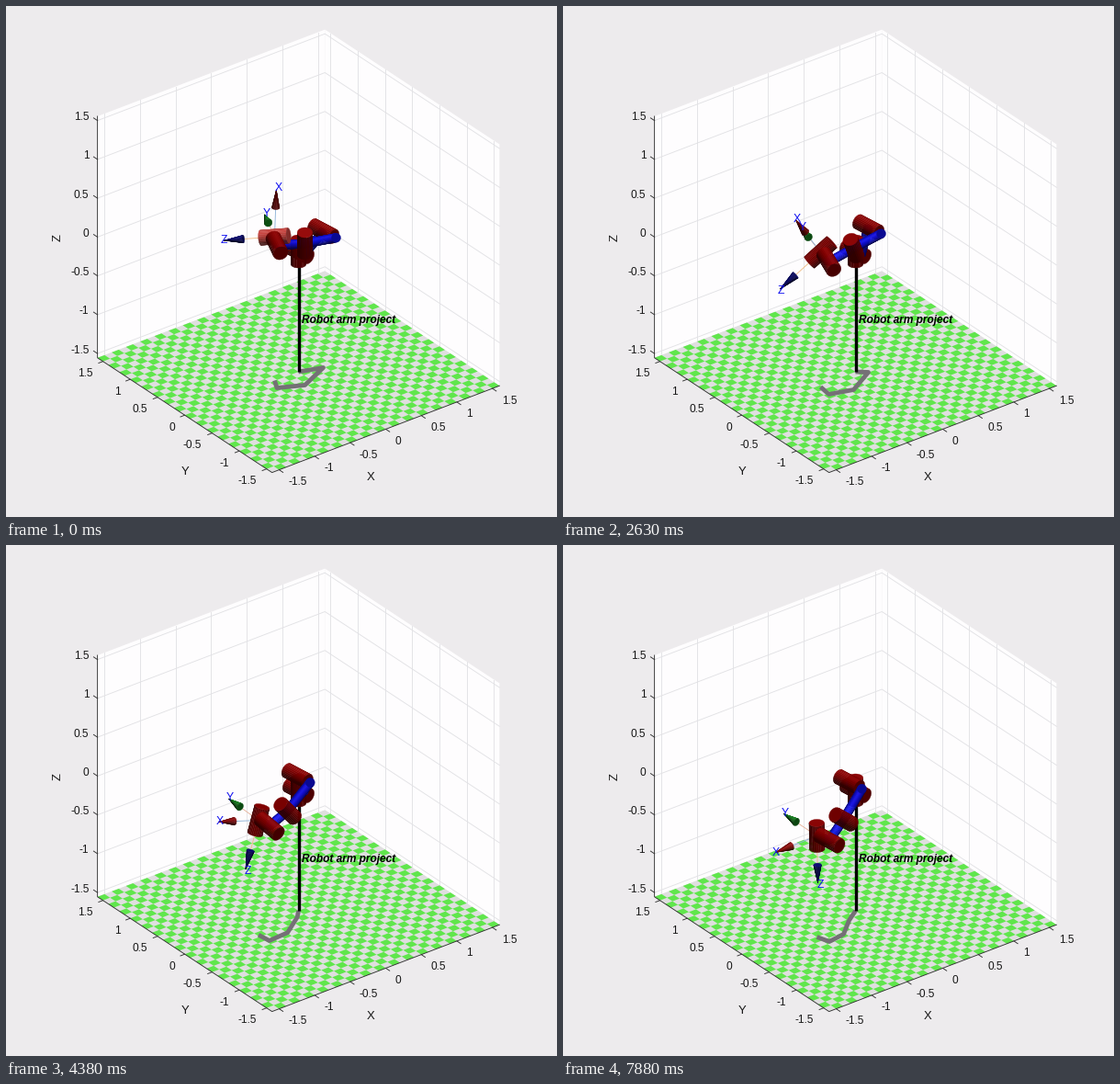
A matplotlib script for the animation above (8000 ms loop, 600 by 556 pixels).

```python
import numpy as np
import matplotlib
import matplotlib.pyplot as plt
from matplotlib.animation import FuncAnimation
from matplotlib.collections import PolyCollection

W, H, DPI = 600, 556, 64
FRAMES, STEP = 64, 125
PT = 72 / DPI
LIM, ZLIM = 1.6, 1.555
TICKS = np.arange(-1.5, 1.6, 0.5)
matplotlib.rcParams["font.family"] = "Liberation Sans"

RED = np.array([0.58, 0.0, 0.0])
PINK = np.array([0.88, 0.3, 0.28])
BLUE = np.array([0.06, 0.06, 0.95])
LIGHT = np.array([0.15, -0.65, 0.75])
JOINT_R, LINK_R, CONE_R, HALF = 8.3, 4.8, 4.3, 16
AXIS_LEN = 58

# Poses along the move: joints hold x, y and the y of their shadow.
NODES = np.array([0, 0.36, 0.66, 1])
JOINTS = {
    "elbow": [(345, 244.5, 393), (332, 240, 398), (321.5, 246, 402), (311, 257.5, 408)],
    "fore": [(325, 258, 412), (316, 263, 417), (308.5, 280, 420), (305, 298, 423)],
    "wrist": [(294.5, 260, 415), (289, 278, 422), (286, 295.5, 428), (289.5, 321, 431)],
    "tool": [(292, 250.5, 407), (280, 267.5, 414), (275, 287.5, 421), (276, 316, 426)],
}
SPINS = {
    "fore": [(0, -12), (-3.5, -9.5), (-6.5, -8.5), (-9, -5)],
    "wrist": [(4, 8.5), (5.5, 9), (8.5, 9), (11, 6)],
}
TRIAD = {
    "Z": [(-55, 4), (-44, 40), (-25, 52), (1, 51)],
    "Y": [(-11, -24), (-21, -26), (-29, -24), (-36, -24)],
    "X": [(2, -51), (-27, -35), (-40, -11), (-45, 18)],
}
CONE = {"X": (0.58, 0.04, 0.04), "Y": (0.08, 0.52, 0.12), "Z": (0.04, 0.04, 0.48)}
STEM = {"X": "#8fb4d8", "Y": "#e6b49c", "Z": "#f0bd86"}
BASE = np.array([318, 266.5])
SIDE = np.array([11.2, 5.9])


def project(x, y, z):
    return (318 + 77.4 * x - 59.4 * y,
            397.5 - 29.5 * x - 39 * y - 84.5 * (z + ZLIM))


def blend(keys, s):
    """Smooth curve through the key poses at progress s."""
    total = 0
    for i, node in enumerate(NODES):
        rest = np.delete(NODES, i)
        total = total + np.prod((s - rest) / (node - rest)) * np.array(keys[i], float)
    return total


def progress(ms):
    t = np.clip((ms + 300) / 6900, 0, 1)
    return t ** 3 * (10 - 15 * t + 6 * t * t)


class Mesh:
    """Shaded polygons, painted in the order they are added."""

    def __init__(self):
        self.verts, self.colors = [], []

    def add(self, poly, normal, rgb):
        lit = max(0, float(np.dot(normal, LIGHT)))
        color = np.array(rgb) * (0.32 + 0.62 * lit) + 0.06 * lit ** 14
        self.verts.append(poly)
        self.colors.append(np.clip(color, 0, 1))

    def tube(self, far, near, r_far, r_near, k, rgb):
        """Cylinder or cone; k is the flatness of its end caps."""
        far, near = np.array(far, float), np.array(near, float)
        u = (near - far) / max(np.hypot(*(near - far)), 1e-6)
        n = np.array([-u[1], u[0]])
        slope = np.sqrt(1 - k * k)

        def ring(a):
            a = np.atleast_1d(a)[:, None]
            return np.cos(a) * n + np.sin(a) * k * u

        angles = np.linspace(np.pi, 2 * np.pi, 15)
        rim = ring(angles)
        mids = (angles[1:] + angles[:-1]) / 2
        for i, mid in enumerate(mids):
            normal = np.append(ring(mid)[0], -np.sin(mid) * slope)
            quad = np.array([far + r_far * rim[i], far + r_far * rim[i + 1],
                             near + r_near * rim[i + 1], near + r_near * rim[i]])
            self.add(quad, normal, rgb)
        if r_near:
            cap = near + r_near * ring(np.linspace(0, 2 * np.pi, 30))
            self.add(cap, np.append(u * slope, k), rgb)

    def joint(self, center, half, rgb=RED):
        k = np.sqrt(max(0.02, 1 - (np.hypot(*half) / HALF) ** 2))
        self.tube(center - half, center + half, JOINT_R, JOINT_R, k, rgb)

    def link(self, a, b):
        self.tube(a, b, LINK_R, LINK_R, 0.5, BLUE)

    def ball(self, center):
        a = np.linspace(0, 2 * np.pi, 24)
        disc = center + 5 * np.column_stack([np.cos(a), np.sin(a)])
        self.add(disc, (0, 0, 0.6), BLUE)

    def cone(self, origin, vec, rgb, toward):
        k = np.sqrt(max(0.03, 1 - min(1, np.hypot(*vec) / AXIS_LEN) ** 2))
        root, tip = origin + 0.62 * vec, origin + vec
        if toward:
            self.tube(root, tip, CONE_R, 0, k, rgb)
        else:
            self.tube(tip, root, 0, CONE_R, k, rgb)


fig = plt.figure(figsize=(W / DPI, H / DPI), dpi=DPI, facecolor="#edebed")
ax = fig.add_axes([0, 0, 1, 1])
# Whole coordinates fall on pixel centres.
ax.set_xlim(-0.5, W - 0.5)
ax.set_ylim(H - 0.5, -0.5)
ax.axis("off")


def stroke(points, color, px, z=1, **kw):
    xs, ys = zip(*points)
    return ax.plot(xs, ys, color=color, lw=px * PT, zorder=z, **kw)[0]


def label(x, y, text, px=11.9, **kw):
    style = dict(ha="center", va="center", color="#161616", zorder=9)
    style.update(kw)
    return ax.text(x, y, text, fontsize=px * PT, **style)


def draw_room():
    b, t, m = -ZLIM, ZLIM, LIM
    left = [(-m, m, b), (m, m, b), (m, m, t), (-m, m, t)]
    right = [(m, m, b), (m, -m, b), (m, -m, t), (m, m, t)]
    for wall in (left, right):
        ax.fill(*zip(*[project(*p) for p in wall]), color="#fefdfe", lw=0, zorder=0)
    grid = "#e2e2e5"
    for v in TICKS:
        stroke([project(v, m, b), project(v, m, t)], grid, 0.9)
        stroke([project(m, v, b), project(m, v, t)], grid, 0.9)
        stroke([project(-m, m, v), project(m, m, v), project(m, -m, v)], grid, 0.9)

    floor = [(-m, -m), (m, -m), (m, m), (-m, m)]
    ax.fill(*zip(*[project(x, y, b) for x, y in floor]), color="#dfdfdf", lw=0, zorder=2)
    tile = 0.1
    tiles = []
    for i in range(32):
        for j in range((i + 1) % 2, 32, 2):
            x, y = -m + i * tile, -m + j * tile
            tiles.append([project(x + dx, y + dy, b)
                          for dx, dy in ((0, 0), (tile, 0), (tile, tile), (0, tile))])
    ax.add_collection(PolyCollection(tiles, facecolors="#60e64c", linewidths=0, zorder=2))


def draw_rulers():
    b, t, m = -ZLIM, ZLIM, LIM
    ink = "#303030"
    stroke([project(-m, m, t), project(-m, m, b), project(-m, -m, b), project(m, -m, b)],
           ink, 0.9, 3)
    for v in TICKS:
        text = f"{v:g}"
        x, y = project(v, -m, b)
        stroke([(x, y), (x + 4.2, y + 2.8)], ink, 0.9, 3)
        label(x + 10, y + 13.5, text, ha="left")
        x, y = project(-m, v, b)
        stroke([(x, y), (x - 4.7, y + 1.8)], ink, 0.9, 3)
        label(x - 11, y + 13.5, text, ha="right")
        x, y = project(-m, m, v)
        stroke([(x, y), (x - 4.2, y - 2.8)], ink, 0.9, 3)
        label(90, y - 3.5, text, ha="right")
    label(397, 513, "X", 13.1)
    label(195, 506, "Y", 13.1)
    label(56, 252, "Z", 13.1, rotation=90)
    stroke([(-1, 555), (W, 555)], "#8c8b8d", 1, 3)


draw_room()
draw_rulers()
shadow = stroke([(0, 0), (1, 1)], "#757076", 4.8, 4,
                solid_joinstyle="round", solid_capstyle="butt")
stroke([(318, 270), (318, 397.5)], "black", 3.4, 5, solid_capstyle="butt")
label(321, 342, "Robot arm project", color="black", ha="left",
      weight="bold", style="italic")
stems = {c: stroke([(0, 0), (1, 1)], STEM[c], 0.9, 6) for c in TRIAD}
solid = PolyCollection([], linewidths=0.4, zorder=7)
ax.add_collection(solid)
letters = {c: label(0, 0, c, 12.2, color="#1010f0") for c in TRIAD}


def update(i):
    s = progress(i * STEP)
    full = {name: blend(keys, s) for name, keys in JOINTS.items()}
    pos = {name: p[:2] for name, p in full.items()}
    spin = {name: blend(keys, s) for name, keys in SPINS.items()}
    triad = {c: blend(keys, s) for c, keys in TRIAD.items()}

    path = np.array([(318, 397.5)] + [(p[0], p[2]) for p in full.values()])
    shadow.set_data(path[:, 0], path[:, 1])

    mesh = Mesh()
    origin = pos["tool"]
    for c, vec in triad.items():
        tip = origin + vec
        stems[c].set_data([origin[0], tip[0]], [origin[1], tip[1]])
        mesh.cone(origin, vec, CONE[c], c == "X")
        x, y = origin + 1.04 * vec
        letters[c].set_position((x + 2.5, y))

    start = pos["elbow"] + (14, 7.2)
    mesh.joint(BASE, SIDE)
    mesh.link(BASE + (6, 3.5), pos["elbow"])
    mesh.joint(BASE, np.array([0, -13.8]))
    mesh.joint(pos["elbow"], SIDE)
    mesh.link(start, pos["fore"])
    mesh.ball(start)
    mesh.link(pos["fore"], pos["wrist"])
    mesh.joint(pos["fore"], spin["fore"])
    mesh.link(pos["wrist"], pos["tool"])
    glow = max(0, 1 - 3 * s)
    mesh.joint(origin, -triad["Z"] / AXIS_LEN * HALF, RED + glow * (PINK - RED))
    mesh.joint(pos["wrist"], spin["wrist"])
    solid.set_verts(mesh.verts)
    solid.set_facecolor(mesh.colors)
    solid.set_edgecolor(mesh.colors)
    return []


anim = FuncAnimation(fig, update, frames=FRAMES, interval=STEP,
                     repeat=True, repeat_delay=0, blit=False)
plt.show()
```
